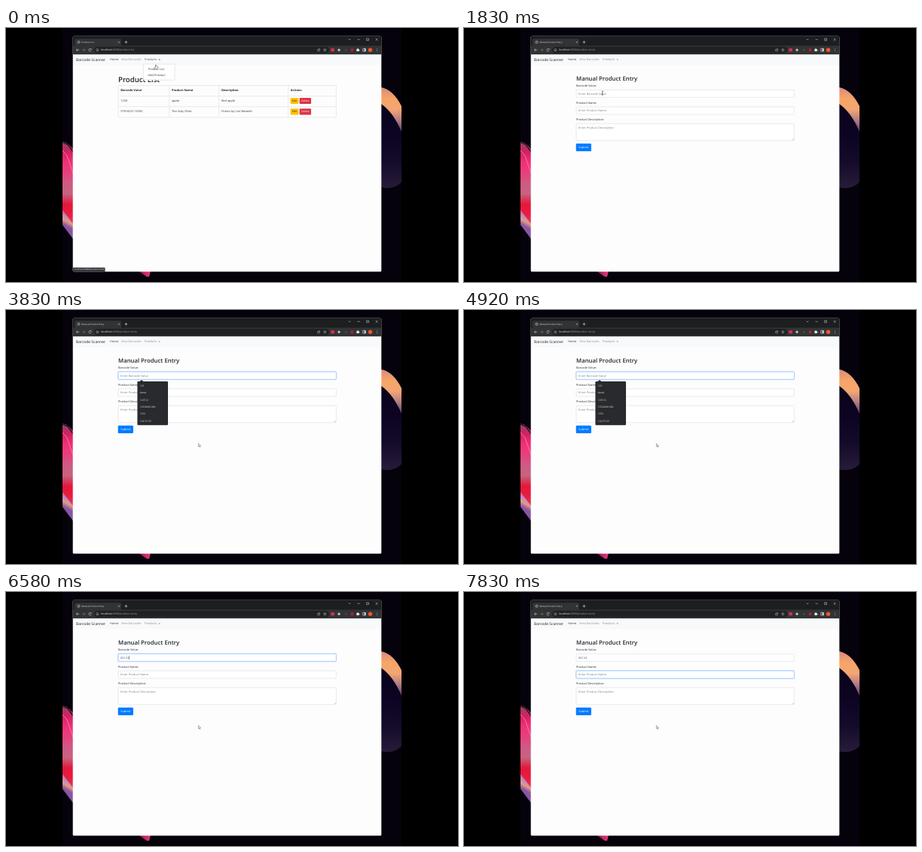
Write an HTML page with a canvas that moves like this. It is 600 px wide and 338 px high and loops after 8 s.

```html
<!DOCTYPE html>
<html lang="en">
<head>
<meta charset="utf-8">
<title>Barcode Scanner</title>
<style>
html, body { margin: 0; width: 100%; height: 100%; overflow: hidden; background: #000; }
canvas { display: block; width: 600px; height: 338px; }
</style>
</head>
<body>
<canvas id="stage"></canvas>
<script>
const canvas = document.getElementById('stage');
const dpr = window.devicePixelRatio || 1;
canvas.width = 600 * dpr;
canvas.height = 338 * dpr;
const ctx = canvas.getContext('2d');
ctx.textRendering = 'geometricPrecision';

const LOOP = 8000;
const TICK = 1000 / 12;
const FONT = '"Open Sans", "Noto Sans", sans-serif';

// Moments of the interaction, in ms
const PRESS = 1165, LOADED = 1415, FOCUS = 2165, POPUP = 2330, NEXT = 6995;
const KEYS = [[4995, '0'], [5330, '0'], [5745, '1'], [6080, '2'], [6330, '3']];

// Pointer stops: time, x, y
const PATH = [
  [0, 199, 49], [500, 198, 63.5], [1330, 198, 63.5], [1920, 183, 88], [2170, 183, 88],
  [2420, 183, 91], [2580, 183, 91], [2750, 187, 96], [2870, 187, 96], [3670, 255.4, 177.6]
];

const clamp = v => Math.max(0, Math.min(1, v));
const mix = (a, b, k) => a + (b - a) * k;
const smooth = k => k * k * (3 - 2 * k);

function rect(x, y, w, h, fill) {
  ctx.fillStyle = fill;
  ctx.fillRect(x, y, w, h);
}

function paint(fill, stroke, lw = 0.6) {
  if (fill) { ctx.fillStyle = fill; ctx.fill(); }
  if (stroke) { ctx.strokeStyle = stroke; ctx.lineWidth = lw; ctx.stroke(); }
}

function round(x, y, w, h, r, fill, stroke, lw) {
  ctx.beginPath();
  ctx.roundRect(x, y, w, h, r);
  paint(fill, stroke, lw);
}

function poly(points, fill, stroke, lw, closed = true) {
  ctx.beginPath();
  points.forEach(([x, y]) => ctx.lineTo(x, y));
  if (closed) ctx.closePath();
  paint(fill, stroke, lw);
}

const line = (points, color, lw) => poly(points, null, color, lw, false);

function disc(x, y, r, fill, stroke, lw) {
  ctx.beginPath();
  ctx.arc(x, y, r, 0, Math.PI * 2);
  paint(fill, stroke, lw);
}

function shape(path, fill) {
  ctx.fillStyle = fill;
  ctx.fill(new Path2D(path));
}

// Laid out at ten times the size so small glyphs keep exact spacing; y is the text's middle.
function text(str, x, y, size, color, weight = 400) {
  ctx.save();
  ctx.translate(x, y + size * 0.31);
  ctx.scale(0.1, 0.1);
  ctx.font = `${weight} ${size * 10}px ${FONT}`;
  ctx.fillStyle = color;
  ctx.fillText(str, 0, 0);
  const w = ctx.measureText(str).width / 10;
  ctx.restore();
  return w;
}

function fade(x0, y0, x1, y1, ...colors) {
  const g = ctx.createLinearGradient(x0, y0, x1, y1);
  colors.forEach((c, i) => g.addColorStop(i / (colors.length - 1), c));
  return g;
}

function wallpaper() {
  rect(0, 0, 600, 338, '#000');
  rect(75, 0, 450, 338, '#05020c');
  ctx.save();
  ctx.beginPath();
  ctx.rect(75, 0, 450, 338);
  ctx.clip();

  // Left petals
  shape('M75 151 Q84 153 90 163 V281 L75 260 Z',
    fade(0, 151, 0, 262, '#8a4a6c', '#d3205f', '#f2307a', '#e8407c', '#cf5a86', '#c8637f', '#e4183c', '#ea1c3e', '#e0406a'));
  line([[75, 152], [82, 155], [90, 166]], '#2a0f24', 1.4);
  line([[75, 163], [81, 170], [90, 196]], '#f58ab4', 0.8);
  shape('M75 242 L90 262 V282 L75 262 Z', fade(86, 248, 78, 262, '#e7506c', '#b98ac8', '#e79a7c', '#8a56a4'));

  // Right petals
  shape('M498 101 Q514 112 525 138 V205 Q514 216 498 212 Z',
    fade(0, 104, 0, 213, '#0a031c', '#0c0422', '#140a2a', '#271c38'));
  shape('M498 79 Q514 82 525 104 V138 Q514 112 498 101 Z',
    fade(0, 79, 0, 138, '#d88a80', '#f6a566', '#f3a672', '#b07a88', '#5f3f68'));

  shape('M175 323 H192 L190 331 H187 Z', fade(175, 0, 191, 0, '#4c0d35', '#c02560', '#d83a78'));
  ctx.restore();
}

function chrome(title, path) {
  const icon = '#c4c7c9', dim = '#808387', bar = '#323335';
  round(88.7, 10.7, 409.6, 313.6, 1.5, '#fdfdfe');
  round(88.7, 10.7, 409.6, 13.3, [1.5, 1.5, 0, 0], '#1d1e20');
  round(91, 14.2, 62, 10, [2, 2, 0, 0], bar);
  disc(96.5, 18.8, 1.6, null, icon);
  line([[95.4, 19.9], [97.6, 17.7]], icon, 0.5);
  text(title, 100.5, 18.8, 2.95, '#e4e6e8');
  line([[148.7, 17.7], [150.9, 19.9]], icon, 0.5);
  line([[150.9, 17.7], [148.7, 19.9]], icon, 0.5);
  line([[157.4, 18.8], [161.4, 18.8]], icon, 0.7);
  line([[159.4, 16.8], [159.4, 20.8]], icon, 0.7);
  line([[454.7, 14.7], [456, 16], [457.3, 14.7]], icon);
  line([[466.5, 15.4], [469.5, 15.4]], icon);
  round(478.7, 14, 2.7, 2.7, 0, null, icon);
  line([[490.7, 14], [493.5, 16.8]], icon);
  line([[493.5, 14], [490.7, 16.8]], icon);

  rect(88.7, 23.5, 409.6, 11.9, bar);
  round(117, 25, 312, 8.4, 4.2, '#202123');
  line([[97.2, 29.2], [93.4, 29.2]], icon, 0.7);
  line([[95, 27.5], [93.3, 29.2], [95, 30.9]], icon, 0.7);
  line([[101.2, 29.2], [105, 29.2]], dim);
  line([[103.4, 27.5], [105.1, 29.2], [103.4, 30.9]], dim);
  ctx.beginPath();
  ctx.arc(111.5, 29.2, 1.7, 0.3, 5.5);
  paint(null, icon);
  poly([[113.4, 27], [113.4, 28.8], [111.7, 28.8]], icon);
  disc(121.3, 29.2, 1.6, null, icon, 0.5);
  line([[121.3, 29], [121.3, 30.2]], icon, 0.5);
  const w = text('localhost', 126, 29.2, 3.55, '#f0f2f4');
  text(':8080/' + path, 126 + w, 29.2, 3.55, '#9aa0a6');

  round(413.6, 28.2, 2.8, 2.6, 0.4, null, icon, 0.5);
  line([[414.8, 29], [417, 27.3]], icon, 0.5);
  const star = Array.from({ length: 10 }, (_, i) => {
    const a = i * Math.PI / 5 - Math.PI / 2, r = i % 2 ? 0.85 : 2;
    return [423.3 + r * Math.cos(a), 29.3 + r * Math.sin(a)];
  });
  poly(star, null, icon, 0.45);
  rect(431.2, 27.2, 4.6, 4, '#e02c50');
  disc(442, 29.2, 1.6, '#c3c6ca');
  disc(451.3, 29.2, 1.5, '#45474b');
  rect(457.8, 27.4, 3.3, 3.7, '#c01c22');
  round(465.3, 28, 3.3, 3.1, 0.3, '#e1e3e5');
  disc(467, 27.9, 0.8, '#e1e3e5');
  disc(468.7, 29.5, 0.8, '#e1e3e5');
  round(473.6, 27.3, 3.7, 3.7, 0.2, null, '#e1e3e5');
  rect(475.6, 27.3, 1.7, 3.7, '#e1e3e5');
  disc(483.5, 29.2, 2.7, '#f0562a');
  [27.6, 29.2, 30.8].forEach(y => disc(492.3, y, 0.45, icon));
}

function navbar(open) {
  rect(89, 35.4, 409, 14.1, '#f8f9fa');
  const link = open ? '#525354' : '#87898a';
  text('Barcode Scanner', 93, 42.2, 4.95, '#202122');
  text('Home', 138, 42.2, 3.95, '#3a3b3c');
  text('View Barcodes', 153, 42.2, 3.95, '#929495');
  text('Products', 184, 42.2, 3.95, link);
  poly([[202.5, 41.6], [205, 41.6], [203.75, 42.9]], link);
}

function button(label, x, y, w, h, size, fill, color, pad) {
  round(x, y, w, h, 1, fill);
  text(label, x + pad, y + h / 2, size, color);
}

function listPage(t, cursorY) {
  const ink = '#33383d', edge = '#e0e4e7';
  const cols = [149, 216.7, 282.7, 374.5, 438.3];
  const rows = [76.5, 90.6, 104.7, 118.9];
  text('Product List', 149, 68.7, 9.6, '#212529', 600);
  rows.forEach(y => line([[149, y], [438.3, y]], edge, 0.7));
  cols.forEach(x => line([[x, 76.5], [x, 118.9]], edge, 0.7));
  ['Barcode Value', 'Product Name', 'Description', 'Actions']
    .forEach((s, i) => text(s, cols[i] + 3.2, 83.2, 3.95, '#212529', 700));
  [['1235', 'apple', 'Red apple'],
   ['9781423113393', 'The Grey Otter', 'Fiction by Carl Bexwith']].forEach((cells, r) => {
    const y = 96.8 + r * 14.4;
    cells.forEach((s, i) => text(s, cols[i] + 3.2, y, 3.9, ink));
    button('Edit', 377.6, y - 3.9, 10.8, 8.1, 3.5, '#ffc107', '#212529', 2.2);
    button('Delete', 389.6, y - 3.9, 15.4, 8.1, 3.5, '#dc3545', '#fff', 2.3);
  });

  round(182.3, 48, 41.7, 21.2, 1, '#fff', '#d5d7d9');
  const pressed = t >= PRESS;
  const hover = cursorY > 59 ? 1 : cursorY > 51 ? 0 : -1;
  if (hover >= 0) rect(182.6, 50.2 + hover * 8.4, 41.2, 8.4, pressed ? '#007bff' : '#f5f6f8');
  text('Product List', 188.6, 54.5, 3.95, ink);
  text('Add Product', 188.6, 62.8, 3.95, pressed ? '#fff' : ink);

  const hint = ['product-list#', 'product-list', 'product-entry'][hover + 1];
  round(89, 318.8, 42.5, 5.2, [0, 1, 0, 0], '#35363a');
  text('localhost:8080/' + hint, 90.4, 321.4, 3.05, '#d5d8db');
}

function field(label, hint, y, h, value, focus, caret) {
  text(label, 149, y - 5.1, 3.9, '#292d31');
  if (focus > 0) round(148.6, y - 0.4, 290.1, h + 0.8, 1.4, null, `rgba(0,123,255,${0.25 * focus})`, 0.9);
  round(149, y, 289.3, h, 1, '#fff', focus > 0.5 ? '#80bdff' : '#d5dade', 0.6);
  const mid = y + 5;
  const w = text(value || hint, 152, mid, 3.9, value ? '#495057' : '#7b848b');
  if (caret) rect(152.2 + (value ? w : 0), mid - 2.6, 0.45, 5.2, '#333');
}

function popup() {
  poly([[177.4, 95.3], [180, 92.9], [182.6, 95.3]], '#292a2d');
  round(174.4, 95, 40.6, 58.3, 1.2, '#292a2d');
  ['123', 'dawd', '123512', '12328491284', '1232', '12415123']
    .forEach((s, i) => text(s, 177.6, 100.8 + i * 9.37, 3.3, '#e8eaed'));
}

function entryPage(t) {
  const typed = KEYS.filter(k => t >= k[0]);
  const value = typed.map(k => k[1]).join('');
  const since = t >= NEXT ? NEXT : typed.length ? typed[typed.length - 1][0] : FOCUS;
  const blink = t >= FOCUS && Math.floor((t - since) / 500) % 2 === 0;
  const enter = clamp((t - FOCUS) / 150), leave = clamp((t - NEXT) / 150);

  text('Manual Product Entry', 149, 67.3, 7.74, '#212529', 600);
  field('Barcode Value:', 'Enter Barcode Value', 82.3, 10, value, enter - leave, blink && t < NEXT);
  field('Product Name:', 'Enter Product Name', 104.9, 10, '', leave, blink && t >= NEXT);
  field('Product Description:', 'Enter Product Description', 127.3, 22.5, '', 0, false);
  line([[435.8, 149.2], [437.7, 147.3]], '#8d9195', 0.4);
  line([[436.9, 149.2], [437.7, 148.4]], '#8d9195', 0.4);
  button('Submit', 148.7, 153.8, 20.2, 10.1, 3.95, '#007bff', '#fff', 3.6);
  if (t >= POPUP && !value) popup();
}

function pointerAt(t) {
  const i = PATH.findIndex(p => p[0] > t);
  if (i < 0) return PATH[PATH.length - 1].slice(1);
  const a = PATH[i - 1], b = PATH[i];
  const k = smooth((t - a[0]) / (b[0] - a[0]));
  return [mix(a[1], b[1], k), mix(a[2], b[2], k)];
}

function pointer(x, y, kind) {
  ctx.save();
  ctx.translate(x, y);
  if (kind === 'beam') {
    line([[-1, -2.5], [1, -2.5]], '#222', 0.5);
    line([[0, -2.5], [0, 2.5]], '#222', 0.6);
    line([[-1, 2.5], [1, 2.5]], '#222', 0.5);
  } else if (kind === 'hand') {
    poly([[-0.4, 0], [0.4, 0], [0.5, 1.8], [2.6, 2.3], [2.6, 4], [1.9, 5.4], [-0.6, 5.4],
      [-2, 3.3], [-1.5, 2.7], [-0.5, 3.4]], '#fff', '#333', 0.45);
  } else {
    poly([[0, 0], [0, 4.2], [1, 3.3], [1.7, 4.9], [2.4, 4.6], [1.7, 3.1], [3, 3]], '#fff', '#333', 0.4);
  }
  ctx.restore();
}

function draw(t) {
  ctx.setTransform(dpr, 0, 0, dpr, 0, 0);
  const entry = t >= LOADED;
  const [x, y] = pointerAt(t);
  wallpaper();
  chrome(entry ? 'Manual Product Entry' : 'Product List', entry ? 'product-entry' : 'product-list');
  navbar(!entry);
  if (entry) entryPage(t); else listPage(t, y);
  const overField = y > 82 && y < 92.5;
  pointer(x, y, !entry ? 'hand' : overField ? 'beam' : 'arrow');
}

let start;
function loop(now) {
  if (start === undefined) start = now;
  const t = (now - start) % LOOP;
  draw(Math.floor(t / TICK + 0.05) * TICK);
  requestAnimationFrame(loop);
}
draw(0);
requestAnimationFrame(loop);
</script>
</body>
</html>
```
